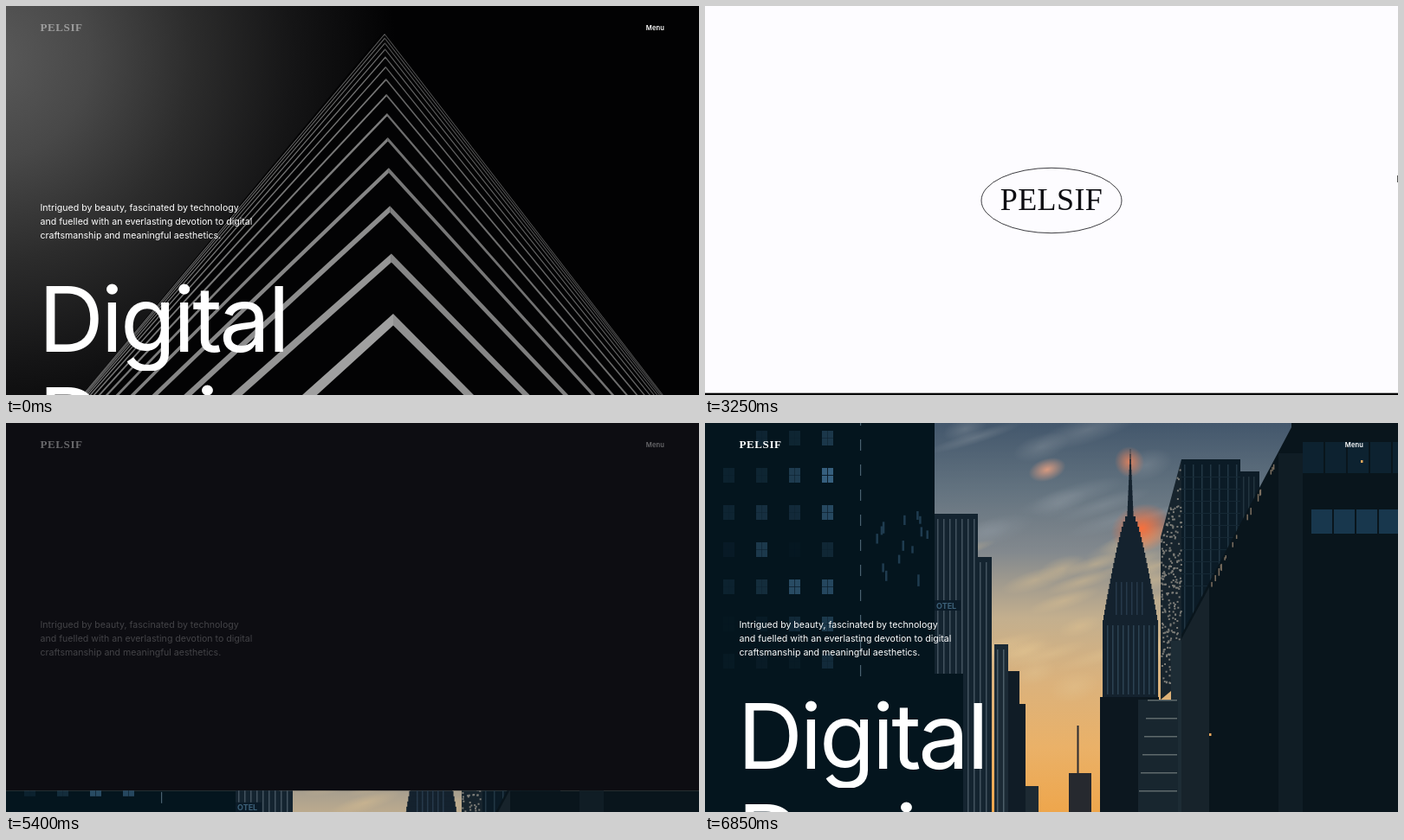
An HTML page with a canvas that plays this animation: 800x450 px, repeating every 6900 ms.

```html
<!DOCTYPE html>
<html lang="en">
<head>
<meta charset="utf-8">
<title>Digital Design</title>
<style>
html, body { margin: 0; width: 100%; height: 100%; overflow: hidden; background: #0d0d12; }
canvas { display: block; width: 800px; height: 450px; }
</style>
</head>
<body>
<canvas id="stage" width="800" height="450"></canvas>
<script>
const ctx = document.getElementById('stage').getContext('2d');
const W = 800, H = 450, LOOP = 6900;
const WHITE = '#fdfcff', INK = '#0d0d12', BRAND = 'PELSIF';
const SERIF = '"Liberation Serif", serif', SANS = 'Inter, sans-serif';

const clamp = v => Math.max(0, Math.min(1, v));
const ramp = (t, from, to) => clamp((t - from) / (to - from));
const expoOut = p => p >= 1 ? 1 : p <= 0 ? 0 : 1 - 2 ** (-10 * p);
const inOut = p => p < .5 ? (2 * p) ** 2.5 / 2 : 1 - (2 - 2 * p) ** 2.5 / 2;

function seeded(seed) {
  return (from = 0, to = 1) => {
    seed = seed * 16807 % 2147483647;
    return from + (to - from) * seed / 2147483647;
  };
}

function rect(color, x, y, w, h) {
  ctx.fillStyle = color;
  ctx.fillRect(x, y, w, h);
}

function poly(color, ...points) {
  ctx.fillStyle = color;
  ctx.beginPath();
  for (const [x, y] of points) ctx.lineTo(x, y);
  ctx.fill();
}

// Fills the stage with evenly spaced colours.
function fillGradient(g, ...colors) {
  colors.forEach((c, i) => g.addColorStop(i / (colors.length - 1), c));
  rect(g, 0, -60, W, H + 60);
}

function text(str, x, y, font, color, align = 'left', spacing = 0) {
  ctx.font = font;
  ctx.fillStyle = color;
  ctx.textAlign = align;
  ctx.letterSpacing = spacing + 'px';
  ctx.fillText(str, x, y);
}

// Runs a drawing routine in its own state, at a given opacity.
function layer(alpha, draw) {
  if (alpha <= 0) return;
  ctx.save();
  ctx.globalAlpha *= alpha;
  draw();
  ctx.restore();
}

function cloud(color, x, y, rx, ry, alpha = 1) {
  layer(alpha, () => {
    ctx.translate(x, y);
    ctx.rotate(-.3);
    ctx.scale(rx, ry);
    const g = ctx.createRadialGradient(0, 0, 0, 0, 0, 1);
    g.addColorStop(0, color);
    g.addColorStop(1, color + '00');
    rect(g, -1, -1, 2, 2);
  });
}

function pyramid(t) {
  fillGradient(ctx.createRadialGradient(-20, 60, 0, -20, 60, 470),
    '#5a5a5a', '#484848', '#2c2c2c', '#151516', '#020203');
  ctx.save();
  const zoom = 1 + .008 * ramp(t, 0, 750);
  ctx.translate(437, 225);
  ctx.scale(zoom, zoom);
  ctx.translate(-437, -225);
  poly('#030304', [437, 28], [86, 452], [761, 452]);
  for (let k = 0; k < 14; k++) {
    const y = 14 + 342 * .797 ** k;
    const u = (y - 28) / 328, x = 437 + 10 * u;
    const left = 87 + 86 * u + 169 * u * u;
    const right = 760 - 112 * u - 108 * u * u;
    const thick = 1.4 + 12 * Math.max(0, u) ** 1.4;
    const side = (foot, shade, w) => poly(`rgb(${shade},${shade},${shade})`,
      [x, y], [foot, H], [foot, H + w], [x, y + thick]);
    side(left, 110 + 50 * u, thick * 1.15);
    side(right, 95 + 50 * u, thick * .85);
  }
  ctx.restore();
}

// A block with thin lit strips, running down past the lower edge.
function tower(x, w, top, color, strip, pitch = 6) {
  rect(color, x, top, w, H - top);
  if (strip) for (let s = x + 3; s < x + w - 1; s += pitch) rect(strip, s, top + 6, 1.5, H - top);
}

function sky() {
  fillGradient(ctx.createLinearGradient(0, 0, 0, H),
    '#43576c', '#62727f', '#83898e', '#c3af8e', '#dbb27c', '#eab168', '#eea64c');
  const rnd = seeded(11);
  for (let i = 0; i < 36; i++) {
    const x = rnd(300, 530), y = rnd(0, 330);
    cloud(y < 130 ? '#8d97a0' : '#e3c592', x, y, rnd(25, 65), rnd(6, 18), .4);
  }
  cloud('#d89a80', 395, 54, 22, 13);
  cloud('#d8805f', 490, 45, 17, 18);
  cloud('#f8703c', 504, 122, 36, 28);
}

function spire() {
  const mid = 491;
  for (let y = 24; y < H; y += 6) {
    const half = y < 108 ? (y - 24) * .045 : 6 + 26 * ramp(y, 108, 228) ** .8;
    rect('#14222e', mid - half, y, half * 2, 6.5);
  }
  for (let x = 464; x < 522; x += 6) rect('#2c4252', x, 234, 1.5, 80);
  for (let x = 474; x < 510; x += 6) rect('#26394a', x, 184, 1.5, 38);
  tower(456, 68, 317, '#0c171f');
}

function leftBlocks() {
  const rnd = seeded(5);
  tower(370, 15, 420, '#1d2a33');
  tower(350, 20, 325, '#101c26');
  tower(350, 13, 287, '#101c26');
  tower(334, 16, 256, '#1b2a35', '#4c5e69', 7);
  tower(265, 66, 155, '#142430', '#43535f', 7);
  tower(265, 50, 105, '#142430', '#43535f', 7);
  rect('#0b1b28', 265, 205, 30, 12);
  text('OTEL', 267, 214.5, 'bold 9px ' + SANS, '#3c6078');
  tower(0, 298, 290, '#04151e');
  tower(0, 265, -60, '#04151e');
  for (let col = 0; col < 4; col++)
    for (let row = 0; row < 7; row++)
      layer(rnd() * (col + 1) / 4, () => {
        const x = 21 + 38 * col, y = 9 + 43 * row;
        rect('#3a6484', x, y, 13, 17);
        rect('#0a1b28', x + 6, y, 1, 17);
        rect('#0a1b28', x, y + 8, 13, 1);
      });
  for (let i = 0; i < 14; i++) rect('#1f3c50', rnd(192, 260), rnd(75, 180), 2.5, rnd(7, 15));
  for (let y = -10; y < 300; y += 29) rect('#496170', 179, y, 1.2, 13);
}

function rightBlocks() {
  const rnd = seeded(23);
  tower(618, 22, 56, '#0d1c27', '#22343f');
  tower(550, 68, 42, '#0b1b26', '#223744', 10);
  for (let y = 62; y < 200; y += 14) rect('#152834', 550, y, 68, 1);

  // Receding lit face
  poly('#17242d', [550, 42], [550, 300], [526, 320], [526, 132]);
  for (let i = 0; i < 260; i++) {
    const x = rnd(526, 549);
    rect('#7d7d78', x, rnd(42 + (550 - x) * 3.75, 300), 2, 2);
  }
  tower(538, 14, 252, '#1d2c35');
  tower(500, 46, 320, '#18262f');
  for (let i = 0; i < 6; i++) rect('#5f6a6c', 501 + i * 2, 425 - i * 21, 44 - i * 2, 1.5);

  // Near block with a slanting roof line
  poly('#09151c', [W, -60], [677, -60], [677, 5], [550, 245], [550, H], [W, H]);
  poly('#17232b', [582, 190], [550, 250], [550, H], [582, H]);
  tower(662, 28, 35, '#101d25');
  for (let i = 0; i < 18; i++) {
    const x = rnd(580, 660);
    rect('#7c6f60', x, 192 - (x - 580) * 1.9, 1.5, rnd(3, 9));
  }
  for (let x = 690; x < W; x += 26) {
    rect('#0d2230', x, 22, 24, 36);
    rect('#18374d', x + 10, 100, 24, 28);
  }
  rect('#e9a85c', 757, 43, 2.5, 3);
  rect('#e9a85c', 582, 359, 2.5, 3);
}

function city() {
  sky();
  tower(429.5, 2, 350, '#2b2a30');
  tower(420, 26, 405, '#26292f');
  spire();
  leftBlocks();
  rightBlocks();
}

function headline(str, base, start, t) {
  const font = '104.5px ' + SANS;
  layer(1, () => {
    ctx.beginPath();
    ctx.rect(0, base - 92, W, 114);
    ctx.clip();
    [...str].forEach((ch, i) => {
      ctx.font = font;
      ctx.letterSpacing = '0px';
      const x = 37.5 + ctx.measureText(str.slice(0, i)).width - 3.1 * i;
      const p = (t - start - 27 * i) / 800;
      text(ch, x, base + 110 * (1 - expoOut(p)), font, '#fff');
    });
  });
}

function copy(t, brandAlpha, menuAlpha, paraAlpha) {
  layer(brandAlpha, () => text(BRAND, 39.5, 29, 'bold 13px ' + SERIF, '#fff', 'left', .6));
  layer(menuAlpha, () => text('Menu', 760, 28, '600 7.6px ' + SANS, '#fff', 'right', .1));
  layer(paraAlpha, () => ['Intrigued by beauty, fascinated by technology',
    'and fuelled with an everlasting devotion to digital',
    'craftsmanship and meaningful aesthetics.'
  ].forEach((line, i) => text(line, 39.5, 236.6 + 16 * i, '10.6px ' + SANS, '#fff')));
  headline('Digital', 400, 5485, t);
  headline('Design', 517, 5545, t);
}

function badge(color, stretch) {
  ctx.strokeStyle = color;
  ctx.lineWidth = .8;
  ctx.beginPath();
  ctx.ellipse(400, 225, 81 * stretch, 37.7, 0, 0, 7);
  ctx.stroke();
  text(BRAND, 400, 235.5, '36px ' + SERIF, color, 'center', .4);
}

function counter(t) {
  const value = Math.round(100 * ramp(t, 2470, 2700));
  const slide = 11 * (1 - (1 - ramp(t, 2700, 3270)) ** 3);
  ctx.beginPath();
  ctx.rect(380, 396, 40, 15);
  ctx.clip();
  text(value + '%', 400, 408.7 + slide, '10.2px ' + SANS, INK, 'center', .4);
}

function loader(t) {
  rect(WHITE, 0, 0, W, H);
  rect('#000', 0, 447.7, W, 3);
  rect('#555', 799, 196, 1, 8);
  const stretch = 1 + .15 * (1 - ramp(t, 1250, 1350))
    + .15 * Math.sin(Math.PI * ramp(t, 2500, 2900));
  const shown = ramp(t, 1220, 1350);
  layer(shown, () => badge(INK, stretch));
  if (t < 3300) layer(shown, () => counter(t));
  if (t < 3900) return;

  // Dark page rising with a curved upper edge
  const top = 450 - 490 * inOut(ramp(t, 3900, 5150));
  const sag = 16.6 + .0226 * top;
  layer(1, () => {
    ctx.beginPath();
    ctx.moveTo(0, top + sag);
    ctx.quadraticCurveTo(400, top - sag, W, top + sag);
    ctx.lineTo(W, H);
    ctx.lineTo(0, H);
    ctx.clip();
    rect(INK, 0, 0, W, H);
    layer(1 - ramp(t, 4870, 5220), () => badge(WHITE, 1));
  });
}

function hero(t) {
  rect(INK, 0, 0, W, H);
  const top = H * (1 - expoOut((t - 5391) / 1220));
  if (top < H) layer(1, () => {
    ctx.beginPath();
    ctx.rect(0, top, W, H);
    ctx.clip();
    ctx.translate(0, top * .55);
    city();
  });
  const nav = ramp(t, 5280, 5600);
  copy(t, nav, nav, ramp(t, 5200, 6100));
}

function frame() {
  const t = performance.now() % LOOP;
  if (t < 750) {
    pyramid(t);
    copy(LOOP, .45, 1, 1);
  } else if (t < 5220) loader(t);
  else hero(t);
  requestAnimationFrame(frame);
}
frame();
</script>
</body>
</html>
```
